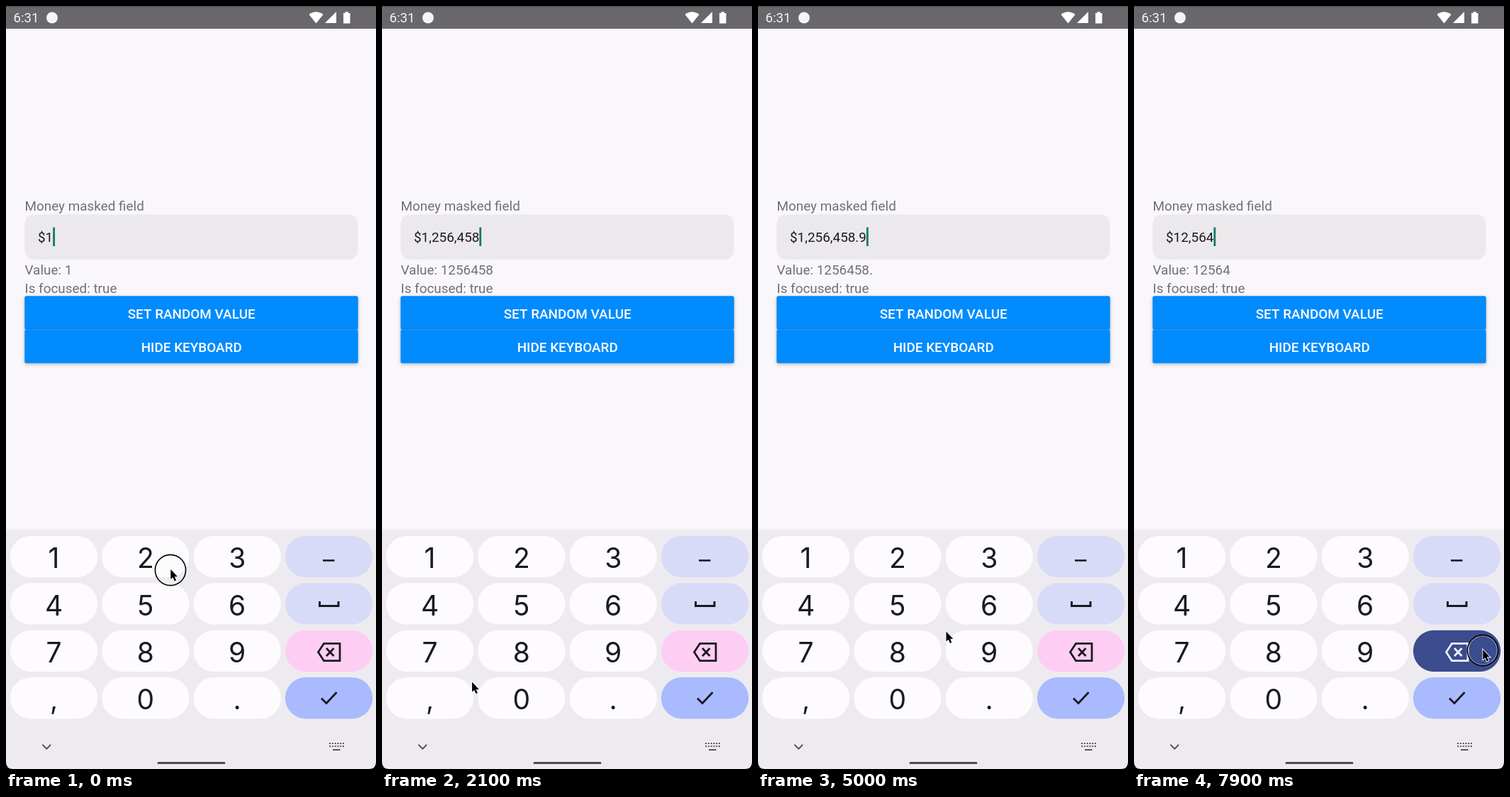
Recreate the animation shown at these times as an HTML page with a canvas. Size 522 px wide and 1074 px high, loop 8000 ms.

```html
<!DOCTYPE html>
<html lang="en">
<head>
<meta charset="utf-8">
<title>Money masked field</title>
<style>
  html, body { margin: 0; width: 100%; height: 100%; overflow: hidden; background: #000; }
  canvas { display: block; }
</style>
</head>
<body>
<canvas id="stage" width="522" height="1074"></canvas>
<script>
const ctx = document.getElementById('stage').getContext('2d');
const LOOP = 8000, STEP = 100;
const HOLD = 150, RIPPLE = 40, VALUE_LAG = 130, BLINK = 500;
const INK = '#1b1a1f', TEXT_SIZE = 18.9;
const KEYS = ['123-', '456_', '789<', ',0.!'];
const KEY_LEFT = 5.8, KEY_TOP = 746, PITCH_X = 129.35, PITCH_Y = 66.35;

const clamp = k => Math.min(1, Math.max(0, k));
const smooth = k => k * k * (3 - 2 * k);

// The key under a point follows from the keyboard grid.
function tap(down, x, y) {
  const row = Math.floor((y - KEY_TOP + 4) / PITCH_Y);
  const col = Math.floor((x - KEY_LEFT + 3) / PITCH_X);
  const key = KEYS[row][col];
  // Backspace acts on touch, the other keys on release.
  return { down, x, y, key, up: down + HOLD, commit: key === '<' ? down : down + HOLD };
}

const taps = [
  tap(0, 232, 794), tap(330, 200, 838), tap(600, 318, 842), tap(990, 85, 828),
  tap(1450, 203, 832), tap(1800, 196, 910), tap(2240, 66, 990), tap(3300, 447, 762),
  tap(4200, 322, 972), tap(4780, 267, 881), tap(5400, 200, 900), tap(5900, 271, 785)
];
for (let i = 0; i < 5; i++) taps.push(tap(7040 + 180 * i, 492, 907));

function typedAt(t) {
  return taps.filter(p => p.commit <= t).reduce((s, { key }) => {
    if (key === '<') return s.slice(0, -1);
    return /^\d+(\.\d{0,2})?$/.test(s + key) ? s + key : s;
  }, '1');
}

function mask(s) {
  const [whole, cents] = s.split('.');
  return '$' + whole.replace(/\B(?=(\d{3})+$)/g, ',') + (cents === undefined ? '' : '.' + cents);
}

function caretVisible(t) {
  const last = Math.max(0, ...taps.map(p => p.commit).filter(c => c <= t));
  return (t - last) % (2 * BLINK) < BLINK;
}

// Rest on each tap, then glide to the next one.
function pointerAt(t) {
  const from = taps.findLast(p => p.down <= t);
  const to = taps.find(p => p.down > t) || from;
  const leave = from.up + 30, arrive = to.down - 30;
  const e = to === from ? 0 : smooth(clamp((t - leave) / (arrive - leave)));
  return [from.x + (to.x - from.x) * e, from.y + (to.y - from.y) * e];
}

function box(x, y, w, h, r, color) {
  ctx.fillStyle = color;
  ctx.beginPath();
  ctx.roundRect(x, y, w, h, r);
  ctx.fill();
}

function text(str, x, y, color, { size = TEXT_SIZE, weight = 400, align = 'left', font = 'Roboto' } = {}) {
  ctx.font = `${weight} ${size}px ${font}, sans-serif`;
  ctx.textAlign = align;
  ctx.fillStyle = color;
  ctx.fillText(str, x, y);
}

function line(d, color, width) {
  ctx.strokeStyle = color;
  ctx.lineWidth = width;
  ctx.stroke(new Path2D(d));
}

function shape(d, color) {
  ctx.fillStyle = color;
  ctx.fill(new Path2D(d));
}

function ring(x, y, r, color, width) {
  ctx.beginPath();
  ctx.arc(x, y, r, 0, 7);
  ctx.strokeStyle = color;
  ctx.lineWidth = width;
  ctx.stroke();
}

function drawStatusBar() {
  box(0, 0, 522, 32, 0, '#69676b');
  box(0, 0, 522, 1, 0, '#4a494c');
  text('6:31', 10.5, 23, '#f4f3f5', { size: 18.6 });
  box(57, 8.5, 16, 16, 8, '#f4f3f5');
  shape('M427.5 12Q437.5 4.5 447.5 12L437.5 24.5Z', '#fff');
  shape('M466 8V24H450Z', '#fff');
  shape('M478.5 8h4v2h3v14.5h-9.5V10h2.5Z', '#fff');
}

function drawForm(t) {
  const grey = '#717074', typed = mask(typedAt(t));
  text('Money masked field', 26.5, 288, grey);
  box(26.5, 293.5, 470, 63.5, 13, '#ebe9eb');
  text(typed, 45, 332, INK);
  if (caretVisible(t)) box(45 + ctx.measureText(typed).width, 311.5, 2.8, 26.5, 0, '#0c7b69');
  text('Value: ' + typedAt(t - VALUE_LAG), 26.5, 378, grey);
  text('Is focused: true', 26.5, 404, grey);

  ['SET RANDOM VALUE', 'HIDE KEYBOARD'].forEach((label, i) => {
    const y = 408.3 + 47.2 * i;
    ctx.shadowColor = 'rgba(0,0,0,.28)';
    ctx.shadowBlur = 5;
    ctx.shadowOffsetY = 1.5;
    box(26.3, y, 470.4, 47.2, 2.5, '#018bfd');
    ctx.shadowColor = 'transparent';
    text(label, 261.7, y + 31.6, '#fff', { weight: 500, align: 'center' });
  });
}

function drawKey(key, col, row, pressed) {
  const x = KEY_LEFT + PITCH_X * col, y = KEY_TOP + PITCH_Y * row;
  const [normal, active] = {
    '-': ['#d7dbf7', '#b6bcda'], '_': ['#d7dbf7', '#b6bcda'],
    '<': ['#fecdf3', '#3b4c8f'], '!': ['#a9baff', '#8f9edb']
  }[key] || ['#fdfbfe', '#d9d7dc'];
  box(x, y, 123.4, 58.2, 29.1, pressed ? active : normal);
  const ink = key === '<' && pressed ? '#f0effb' : INK;
  if (key === '-') line('M447 780.5h16.5', ink, 2.6);
  else if (key === '_') line('M442.5 838v6.6h26.5v-6.6', ink, 3);
  else if (key === '<') line('M448.5 897.3H471V921.7H448.5L440.5 909.5ZM452 904l10.5 11M462.5 904l-10.5 11', ink, 2.8);
  else if (key === '!') line('M445 974.5l7 7L466.5 966', ink, 2.8);
  else text(key, x + 61.7, y + 45.4, ink, { size: 39, align: 'center', font: 'Inter' });
}

function drawKeyboard(t) {
  box(0, 736, 522, 338, 0, '#f2f0f4');
  box(0, 738, 522, 336, 0, '#eeebf0');
  const held = taps.find(p => t >= p.down + RIPPLE && t < p.up + RIPPLE);
  KEYS.forEach((keys, row) => [...keys].forEach((key, col) =>
    drawKey(key, col, row, held && held.key === key)));

  line('M51.5 1039.8l5.8 5.8 5.8-5.8', '#58565b', 2);
  for (let i = 0; i < 12; i++)
    box(456 + 3.8 * (i % 6), 1037 + 4 * Math.floor(i / 6), 2, 2, 0, '#58565b');
  box(461, 1046, 10.5, 2, 0, '#58565b');
  box(213.5, 1064, 96, 3, 1.5, '#4d4b50');
  // Rounded lower corners of the screen
  shape('M0 1064Q0 1074 10 1074H0ZM522 1064Q522 1074 512 1074H522Z', '#000');
}

function drawPointer(t) {
  const [x, y] = pointerAt(t);
  if (taps.some(p => t >= p.down && t < p.up)) {
    ring(x, y, 20.3, 'rgba(255,255,255,.5)', 1.2);
    ring(x, y, 21.6, '#000', 1.6);
  }
  ctx.save();
  ctx.translate(x + .3, y - 1);
  const arrow = 'M0 0V14L3.1 11.2 5.4 16.5 7.8 15.5 5.6 10.3H9.8Z';
  line(arrow, '#fff', 1.8);
  shape(arrow, '#000');
  ctx.restore();
}

function draw(now) {
  const t = Math.floor(now % LOOP / STEP) * STEP;
  box(0, 0, 522, 1074, 0, '#f9f7fb');
  drawStatusBar();
  drawForm(t);
  drawKeyboard(t);
  drawPointer(t);
}

const start = performance.now();
function tick() {
  draw(performance.now() - start);
  requestAnimationFrame(tick);
}
tick();
</script>
</body>
</html>
```
